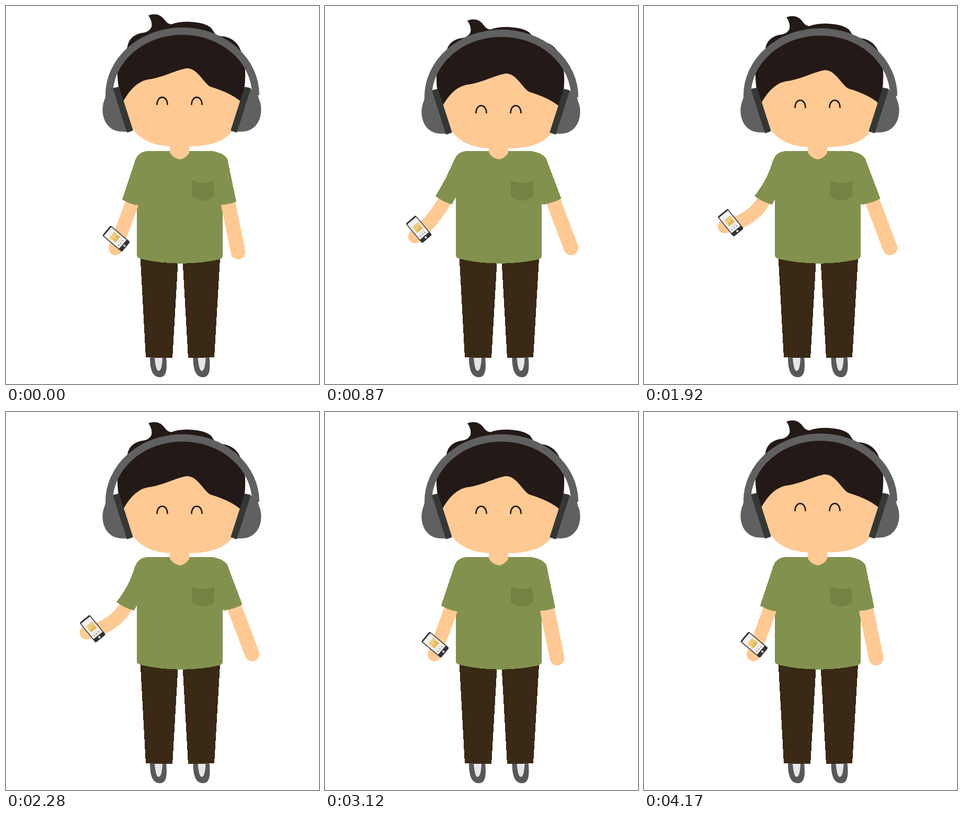
Write an HTML page that moves like this. It is 598 by 722 pixels and loops after 4200 ms.

```html
<!DOCTYPE html>
<html lang="en">
<head>
<meta charset="utf-8">
<title>Listening to music</title>
<style>
html, body { margin: 0; width: 100%; height: 100%; overflow: hidden; background: #fff; }
svg { display: block; width: 598px; height: 722px; }
.skin { fill: #ffc993; }
.shirt { fill: #82924e; }
.limb { fill: none; stroke: #ffc993; stroke-linecap: round; }
.gray { fill: #606060; }
.bar { fill: #343834; stroke: #343834; stroke-width: 3; stroke-linejoin: round; }
.shirt, .limb, .legs { shape-rendering: crispEdges; }
</style>
</head>
<body>
<svg viewBox="0 0 598 722">
  <defs>
    <g id="shoe">
      <path fill="#585858" d="M275 671C275 690 278 709 294 709C308 709 308 690 306 671Z"/>
      <path fill="#e6e6ea" d="M284 671Q286 697 291.500 697Q298 697 299 671Z"/>
    </g>
    <g id="cup">
      <path class="gray" d="M191 160Q191 174 187 182C179 207 190 240 222 240H234L207 158Z"/>
      <path class="bar" d="M206 158L215 156L241 237L232 240Z"/>
    </g>
    <path id="eye" fill="none" stroke="#1a1411" stroke-width="2.6" d="M288.5 189C288.5 169.5 308.5 169.5 308.5 189"/>
  </defs>

  <use href="#shoe"/>
  <use href="#shoe" x="82.5"/>
  <path class="legs" fill="#3a2915" d="M256.500 478H328.500V491L318 672.500L267 671ZM337 478H409V482L398 671L348 672.500Z"/>
  <path class="shirt" d="M246 297Q251 278 272 277H393Q415 280 423 292L414 360V476Q414 482 408 484Q332 500 257 483Q250 481 250 475V340Z"/>
  <path fill="#738442" d="M355 333Q376 343 398 333V363Q376 381 355 363Z"/>

  <g id="leftArm">
    <path id="forearm" class="limb" stroke-width="26"/>
    <path id="sleeve" class="shirt"/>
    <g id="phone">
      <rect x="-24.500" y="-12.500" width="49" height="25" rx="2.500" fill="#333"/>
      <rect x="-21.500" y="-11" width="38" height="22" fill="#f0f0f2"/>
      <rect x="-11.500" y="-8" width="15" height="15" fill="#f2cd7e"/>
      <path fill="#e3b75b" d="M3.500 7L-4 3.500L0 .5L-6 -3.500L3.500 -8Z"/>
      <path stroke="#ccc" d="M8 -6V6"/>
      <path stroke="#777" stroke-width="2" stroke-dasharray="2 3.500" d="M12 -6V7"/>
      <circle cx="20.500" r="2" fill="#fff"/>
    </g>
  </g>
  <g id="rightArm">
    <path class="limb" stroke-width="28" d="M424 375L443.500 470"/>
    <path class="shirt" d="M423 292L440 374Q425 380 402 380L390 300Z"/>
  </g>

  <path class="skin" d="M313 262V280Q320 291 332 293Q342 292 350 281V262Z"/>
  <path id="face" class="skin" d="M222 150C220 225 250 268 318 268H352C428 268 456 232 449 150L400 110H270Z"/>
  <path id="hair" fill="#231916" d="M272 18Q293 10 305 29Q309 34 316 35Q328 30 348 30Q380 31 392 42L398 51Q402 58 415 58Q440 62 449 86Q457 105 457 125Q458 158 449 183Q430 166 390 154C377 146 365 118 345 119C325 122 300 137 270 140.500Q244 146 224 182Q212 158 213 122L232 78C235 58 252 52 263 51Q274 49 278 40Q280 29 272 18Z"/>
  <g id="eyes"><use href="#eye"/><use href="#eye" x="66"/></g>
  <g id="headphones">
    <path fill="none" stroke="#606060" stroke-width="14" d="M197 170A140 122 0 0 1 477 170"/>
    <use href="#cup"/>
    <use href="#cup" transform="translate(672)scale(-1 1)"/>
  </g>
</svg>
<script>
const LOOP = 4200, STEP = 30, NOD = 600;
const el = id => document.getElementById(id);
const put = (id, attr, value) => el(id).setAttribute(attr, value);
const ramp = (t, from, to) => Math.min(1, Math.max(0, (t - from) / (to - from)));

function draw(now) {
  const t = Math.floor(now % LOOP / STEP) * STEP;

  // Each part of the head nods by its own amount.
  const nod = (1 - Math.cos(2 * Math.PI * t / NOD)) / 2;
  const depth = { face: 4, headphones: 4, hair: 10.2, eyes: 16.3 };
  for (const id in depth) put(id, 'transform', `translate(0 ${depth[id] * nod})`);

  // The arms swing out, then the elbow bends; the return runs backwards.
  const swing = ramp(t, 495, 795) - ramp(t, 2475, 2775);
  const bend = ramp(t, 795, 985) - ramp(t, 2285, 2475);
  put('leftArm', 'transform', `rotate(${9 * swing} 262 298)`);
  put('rightArm', 'transform', `rotate(${-9 * swing} 406 298)`);
  put('forearm', 'd', `M242 373Q225.5 418 ${209 - 34.5 * bend} ${463 - 26.6 * bend}`);
  put('sleeve', 'd', `M246 297Q${234 + 8 * bend} 334 222 370Q237 379 ${254 + 4 * bend} 381L282 300Z`);
  put('phone', 'transform',
    `translate(${210.5 - 25.7 * bend} ${444.5 - 16.8 * bend}) rotate(${40 + 2 * bend})`);
}

const start = performance.now();
function tick() {
  draw(performance.now() - start);
  requestAnimationFrame(tick);
}
tick();
</script>
</body>
</html>
```
